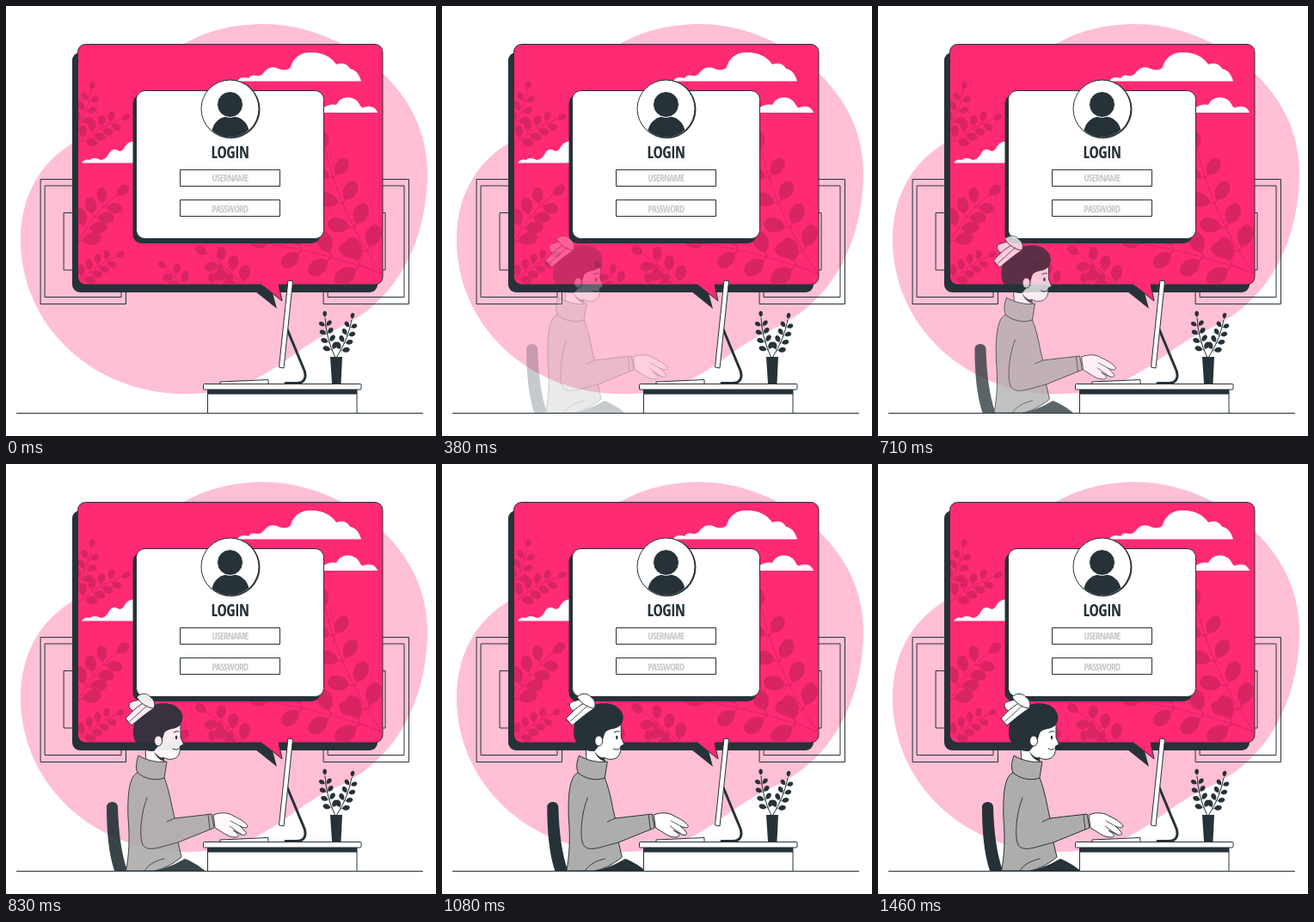
Recreate the animation shown at these times as an HTML page. Size 500 by 500 pixels, loop 1500 ms.

```html
<!DOCTYPE html>
<html lang="en">
<head>
<meta charset="utf-8">
<title>Login</title>
<style>
  html, body { margin: 0; width: 100%; height: 100%; overflow: hidden; background: #fff; }
  svg { display: block; width: 100vw; height: 100vh; }
  text {
    font-family: "Noto Sans ExtraCondensed", "Open Sans Condensed", "Roboto Condensed", "Liberation Sans Narrow", Roboto, sans-serif;
    font-stretch: extra-condensed; text-anchor: middle; letter-spacing: -.6px;
  }
  .ink { fill: #263238; }
  .line { fill: none; stroke: #263238; stroke-linecap: round; stroke-linejoin: round; }
  .box { fill: #fff; stroke: #263238; stroke-linejoin: round; }
  .pink { fill: #ff2a74; stroke: #263238; }
  .hint { fill: #c7c7c7; font-size: 11px; }
  .wool { fill: #adadad; }
</style>
</head>
<body>
<svg viewBox="0 0 500 500">
  <defs>
    <clipPath id="panel"><rect x="84" y="45" width="353.500" height="278.500" rx="9"/></clipPath>
    <clipPath id="disc"><circle cx="260.5" cy="119.5" r="33"/></clipPath>
    <path id="frame" class="line" d="M40.5 201.5H139.5V346.500H40.5ZM45.5 209H134V338.500H45.5ZM67.5 240.5H112V307H67.5Z"/>
  </defs>

  <path fill="#ffbfd5" d="M300 21C388 21 490 92 490 193C490 266 460 342 384 376C324 402 300 452 208 451C100 451 17 370 17 272C17 215 45 178 80 158C130 130 150 90 195 52C225 30 262 21 300 21Z"/>
  <use href="#frame"/>
  <use href="#frame" x="329"/>

  <!-- speech bubble -->
  <g class="ink">
    <rect x="77" y="54" width="355" height="279" rx="9"/>
    <path d="M290 332L315 352L309 330Z"/>
  </g>
  <rect class="pink" x="83.5" y="44.5" width="354.5" height="279.5" rx="9"/>
  <path class="pink" d="M297 324L321 343L317 324"/>
  <path fill="#ff2a74" d="M297 322H317V325H298Z"/>
  <g id="foliage" clip-path="url(#panel)" fill="#d92463" stroke="#d92463"></g>
  <g fill="#fff">
    <path d="M269 87.5C271 83 277 82 282 84Q285 79 291 81C297 82 299 78 302 75C307 70 313 71 317 73C322 75 329 75 331 71C334 60 343 53 355 54C369 54 379 60 384 68C391 65 398 68 400 73C407 74 411 80 413 87.500Z"/>
    <path d="M366 120Q377 113 384 115C388 106 400 103 408 110C412 114 412 119 416 118C424 115 430 118 432 124H366Z"/>
    <path d="M88 182.5Q92 177 98 179C101 176 106 177 110 179C115 179 118 175 120 171C123 166 127 166 130 168C133 170 136 168 138 164C141 159 145 157 152 157V182.500Z"/>
  </g>

  <!-- login card -->
  <rect class="ink" x="147.5" y="103" width="218" height="173" rx="10"/>
  <rect class="box" x="151.5" y="98.5" width="218" height="172" rx="10"/>
  <circle class="ink" cx="261.5" cy="120" r="34"/>
  <circle class="box" cx="260.5" cy="119.5" r="33.5"/>
  <g class="ink" clip-path="url(#disc)">
    <path d="M239 160V147C241 134 250 128 261 128C272 128 281 134 283 147V160Z"/>
    <circle cx="260.5" cy="114.5" r="15" stroke="#fff"/>
  </g>
  <text class="ink" x="260.5" y="177" font-size="19">LOGIN</text>
  <rect class="box" x="202.5" y="190.5" width="116" height="19"/>
  <rect class="box" x="202.5" y="225.5" width="116" height="19"/>
  <text class="hint" x="260.5" y="204.3">USERNAME</text>
  <text class="hint" x="260.5" y="239.8">PASSWORD</text>

  <g id="woman">
    <path class="ink" d="M121 399C121 391 134 391 134 399C135 430 138 452 145 473H130C123 452 121 425 121 399Z"/>
    <path class="ink" d="M170 473.5C190 472 202 464 212 459C222 463 231 469 236 473.500Z"/>
    <path class="box" d="M245 408C255 404 264 406 268 409C277 413 284 418 285 421C285 424 280 423 276 421L282 427C285 431 282 432 278 431L268 426C276 431 276 434 270 434C262 434 256 428 247 423Z"/>
    <path class="line" stroke-width=".8" d="M276 421L265 415M278 431L264 421"/>
    <path class="box wool" d="M157 359C147 363 145 385 146 412C148 435 147 455 143.5 473H176C189 471 201 463 208 457L204 440L246 423L243 407L200 412C196 395 194 380 188 365Z"/>
    <path class="line" stroke-width=".9" d="M168 388C161 405 159 430 162 440C164 449 174 448 182 446L204 440M200 412L191 416M165 473C170 465 179 461 188 459M239 408L241 425"/>
    <path class="box" d="M166 330L178 316L196 307L207 303L207 318L210.5 326L206.5 328C207 336 204 342 198 343C194 344 190 343 187 341L189 350H167Z"/>
    <path class="ink" d="M176 334C180 340 184 342 187 341L188 346C182 344 178 340 176 334Z"/>
    <path class="box wool" d="M158 339C166 344 180 348 191 346L188 365C178 369 165 366 157 359C154 352 156 345 158 339Z"/>
    <path class="ink" d="M152 315C151 300 157 292 166 285C176 277 195 276 203 283C211 289 211 298 206 304C200 310 192 306 188 313L185 323L176 334C168 335 154 330 152 315Z"/>
    <ellipse class="box" cx="181" cy="322" rx="4.5" ry="6"/>
    <ellipse class="ink" cx="202" cy="318" rx="1.2" ry="2.2"/>
    <path class="line" d="M199 312Q202 310 205 311M198 331Q203 334 206 330"/>
    <path class="box" d="M164 273C156 275 147 276 147 280C147 284 150 287 154 288C160 286 168 282 173 279Z"/>
    <path class="box" d="M168 276C158 280 149 289 143 296L150 304C158 297 168 289 176 284Z"/>
    <path class="box" d="M156 271C160 266 168 266 172 271C176 274 178 278 176 284C169 284 160 278 156 271Z"/>
    <path class="line" stroke-width=".8" d="M168 281L148 299"/>
  </g>

  <!-- desk -->
  <path class="line" d="M12.5 473.5H484.500"/>
  <rect class="box" x="234.5" y="446" width="173.5" height="27.5"/>
  <rect class="ink" x="234.5" y="446" width="173.5" height="5.5"/>
  <rect class="box" x="229.5" y="439.5" width="183.5" height="6.500" rx="1"/>
  <path class="box" d="M249 437L305 434.5V439.500H249Z"/>
  <path class="line" stroke-width="3" d="M327 376L347 424C350 433 346 438.5 338 438.500H325"/>
  <path class="box" d="M328 319L333.5 320L323 421L317.500 420Z"/>
  <path class="ink" d="M377 408H391L389.5 439H379Z"/>
  <g id="plant" class="ink" stroke="#263238"></g>
</svg>
<script>
  const byId = id => document.getElementById(id);

  // A curved stem with leaf pairs along it and one leaf at the tip.
  function branch([x1, y1, x2, y2, bend, pairs, size]) {
    const dx = x2 - x1, dy = y2 - y1;
    const cx = (x1 + x2) / 2 - dy * bend, cy = (y1 + y2) / 2 + dx * bend;
    const leaf = (x, y, angle, s) =>
      `<path stroke="none" transform="translate(${x} ${y}) rotate(${angle}) scale(${s})" d="M0-.02H.2C.35-.36 .95-.36 1 0C.95.36 .35.36 .2.02H0"/>`;
    let out = `<path fill="none" d="M${x1} ${y1}Q${cx} ${cy} ${x2} ${y2}"/>`;
    for (let i = 1; i <= pairs + 1; i++) {
      const t = i / (pairs + 1), u = 1 - t;
      const x = u * u * x1 + 2 * u * t * cx + t * t * x2;
      const y = u * u * y1 + 2 * u * t * cy + t * t * y2;
      const angle = Math.atan2(u * (cy - y1) + t * (y2 - cy), u * (cx - x1) + t * (x2 - cx)) * 180 / Math.PI;
      const s = size * (1.1 - .3 * t);
      out += i > pairs ? leaf(x, y, angle, s) : leaf(x, y, angle - 52, s) + leaf(x, y, angle + 52, s);
    }
    return out;
  }

  byId("foliage").innerHTML = [
    [80, 146, 99, 99, .1, 3, 15],
    [80, 164, 132, 132, -.1, 4, 17],
    [78, 290, 126, 222, -.15, 4, 26],
    [80, 325, 126, 292, -.1, 4, 16],
    [212, 335, 188, 306, .1, 2, 17],
    [228, 335, 260, 303, .1, 2, 16],
    [285, 338, 236, 290, .1, 3, 23],
    [445, 314, 310, 277, .05, 3, 34],
    [438, 312, 372, 170, -.1, 4, 32]
  ].map(branch).join("");

  byId("plant").innerHTML = [
    [383, 409, 371, 363, -.1, 4, 10.5],
    [384, 409, 402, 365, .1, 4, 10.5]
  ].map(branch).join("");

  // cubic-bezier(.36, -.01, .5, 1.38)
  const bezier = (a, b, s) => 3 * (1 - s) ** 2 * s * a + 3 * (1 - s) * s * s * b + s ** 3;
  function ease(x) {
    let low = 0, high = 1;
    for (let i = 0; i < 30; i++) {
      const mid = (low + high) / 2;
      if (bezier(.36, .5, mid) < x) low = mid; else high = mid;
    }
    return bezier(-.01, 1.38, low);
  }

  const LOOP = 1500, FPS = 24, STEPS = 36, TRAVEL = 30;
  const woman = byId("woman");
  function draw() {
    const step = Math.floor((performance.now() % LOOP + 5) * FPS / 1000) % STEPS;
    const p = ease(step / (STEPS - 1));
    woman.setAttribute("transform", `translate(${TRAVEL * (p - 1)} 0)`);
    woman.setAttribute("opacity", Math.min(1, Math.max(0, p * 1.05)));
    requestAnimationFrame(draw);
  }
  draw();
</script>
</body>
</html>
```
